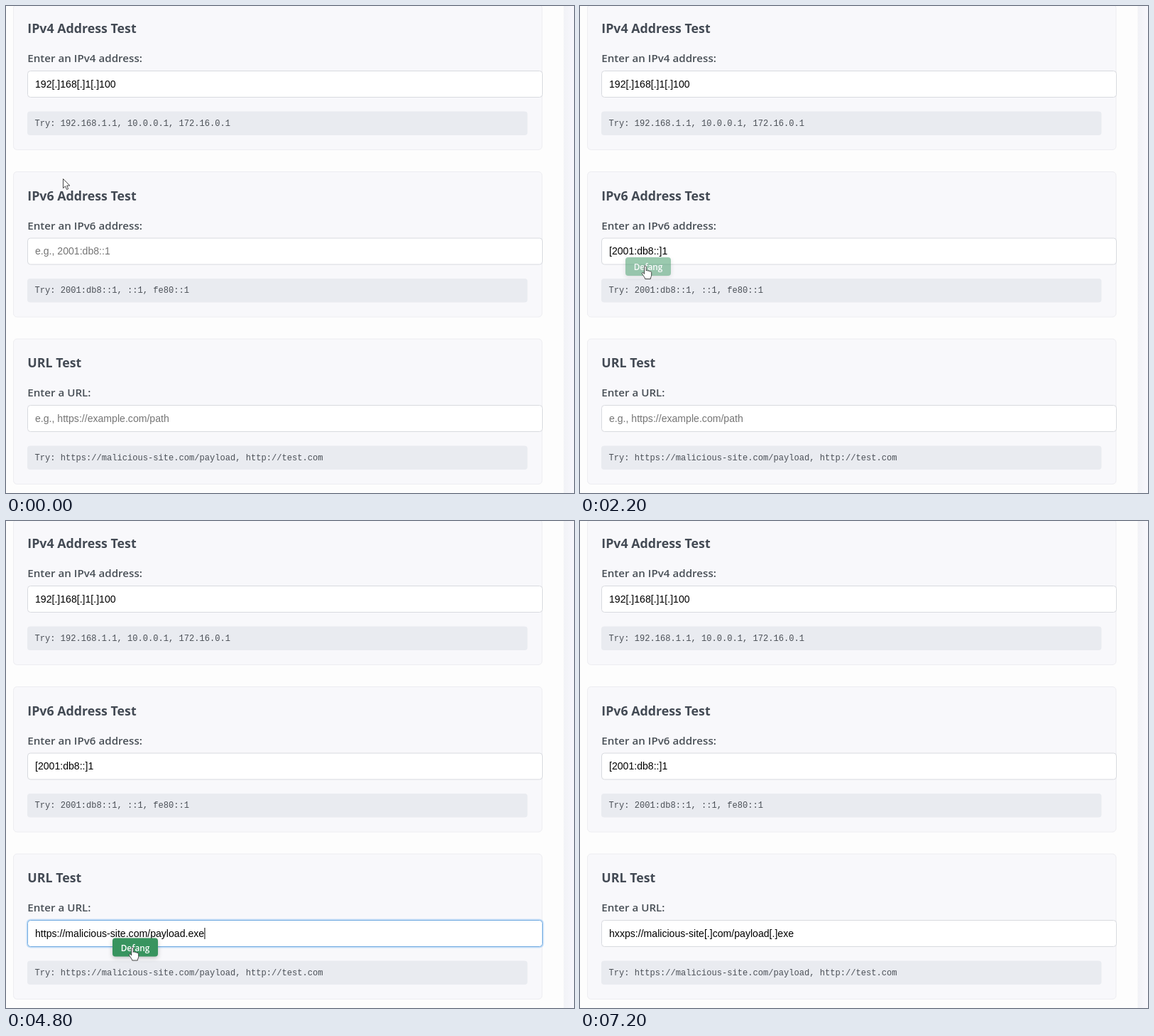
Animation of 800x686 px, one loop 7300 ms. Source, as an HTML page:

```html
<!DOCTYPE html>
<html lang="en">
<head>
<meta charset="utf-8">
<title>Defang test</title>
<style>
  html, body { margin: 0; width: 100%; height: 100%; overflow: hidden; background: #fdfdfd; }
  svg { display: block; width: 800px; height: 686px; }
  .title, .label, .btn text { font-family: "Open Sans", "Noto Sans", sans-serif; font-weight: 600; }
  .title { font-size: 17.8px; font-weight: 700; fill: #434a54; }
  .label { font-size: 15.15px; fill: #495057; }
  .value { font-family: "Liberation Sans", Arial, sans-serif; font-size: 14.1px; }
  .hint { font-family: "Liberation Mono", "Courier New", monospace; font-size: 12.08px; fill: #4b5057; white-space: pre; }
  .card { fill: #f8f8fb; stroke: #ededf1; }
  .field { fill: #fff; stroke: #d8dadf; }
  .ring { fill: none; stroke: #c9e0f8; stroke-width: 4; }
  .box { fill: #e9ebf0; }
  .btn text { font-size: 11.8px; fill: #fff; text-anchor: middle; }
  .btn rect { filter: drop-shadow(0 2px 3px rgba(0, 0, 0, .22)); }
</style>
</head>
<body>
<svg id="stage" viewBox="0 0 800 686">
  <defs>
    <linearGradient id="edge">
      <stop offset="0" stop-color="#f1f2f6"/>
      <stop offset="1" stop-color="#f8f8fd"/>
    </linearGradient>
  </defs>
  <rect width="800" height="686" fill="#fdfdfd"/>
  <rect x="785.5" width="14.5" height="686" fill="url(#edge)"/>
</svg>
<script>
const NS = "http://www.w3.org/2000/svg";
const LOOP = 7300, STEP = 100, FADE = 200;
const stage = document.getElementById("stage");

function add(parent, tag, attrs, text) {
  const el = document.createElementNS(NS, tag);
  for (const k in attrs) el.setAttribute(k, attrs[k]);
  if (text) el.textContent = text;
  parent.appendChild(el);
  return el;
}

const sections = [
  { y: 0, title: "IPv4 Address Test", label: "Enter an IPv4 address:",
    hint: "Try: 192.168.1.1, 10.0.0.1, 172.16.0.1",
    done: "192[.]168[.]1[.]100", focus: -1, paste: -1, click: -1 },
  { y: 235.5, title: "IPv6 Address Test", label: "Enter an IPv6 address:",
    hint: "Try: 2001:db8::1, ::1, fe80::1", empty: "e.g., 2001:db8::1",
    raw: "2001:db8::1", done: "[2001:db8::]1",
    focus: 900, paste: 1000, click: 2100, btn: [64, 353.5], hover: [1100, 2400] },
  { y: 471, title: "URL Test", label: "Enter a URL:",
    hint: "Try: https://malicious-site.com/payload, http://test.com",
    empty: "e.g., https://example.com/path",
    raw: "https://malicious-site.com/payload.exe",
    done: "hxxps://malicious-site[.]com/payload[.]exe",
    focus: 3600, paste: 4000, click: 5000, btn: [150, 587.5], hover: [4400, 5200] }
];

for (const s of sections) {
  const g = add(stage, "g", { transform: `translate(0 ${s.y})` });
  add(g, "rect", { class: "card", x: 10.5, y: -2, width: 744.5, height: 204.5, rx: 5 });
  add(g, "text", { class: "title", x: 30.3, y: 38 }, s.title);
  add(g, "text", { class: "label", x: 30.3, y: 79 }, s.label);
  const shape = { x: 30.5, y: 91.5, width: 725, height: 37, rx: 4 };
  s.ring = add(g, "rect", { class: "ring", ...shape });
  s.field = add(g, "rect", { class: "field", ...shape });
  s.value = add(g, "text", { class: "value", x: 41, y: 114.7 }, s.done);
  s.caret = add(g, "rect", { y: 102, width: 1, height: 16 });
  add(g, "rect", { class: "box", x: 30, y: 148.5, width: 704.5, height: 33.5, rx: 4 });
  add(g, "text", { class: "hint", x: 40.5, y: 168.7 }, s.hint);
}

for (const s of sections) {
  if (!s.btn) continue;
  s.button = add(stage, "g", { class: "btn" });
  s.face = add(s.button, "rect", { width: 64, height: 26, rx: 4 });
  add(s.button, "text", { x: 32, y: 18 }, "Defang");
}

const thin = { fill: "#fff", stroke: "#333", "stroke-width": 0.9, "stroke-linejoin": "round" };
const cursors = {
  arrow: add(stage, "path", { ...thin, d: "M.5.5V13.6L3.5 10.8 5.6 15.5 7.7 14.6 5.7 10H9.8Z" }),
  hand: add(stage, "path", { ...thin, d:
    "M-1.4 1.2C-1.4-.5 1.2-.5 1.2 1.2V7C1.6 5.8 3.6 6 3.8 7.4 4.4 6.4 6.1 6.8 6.3 8.1 " +
    "7.2 7.3 8.7 8 8.7 9.4V13C8.7 15 7.4 16 7.3 18.5H-.2C-.4 16.6-2.7 14.2-4.4 11.4" +
    "-5.3 9.8-3.6 8.9-2.6 10L-1.4 11.4Z" }),
  beam: add(stage, "path", { fill: "none", stroke: "#111", "stroke-width": 1.7,
    d: "M-4-7H-1Q0-7 0-6 0-7 1-7H4M0-6V6M-4 7H-1Q0 7 0 6 0 7 1 7H4" })
};

// time, x, y, cursor kind from that time on
const path = [
  [0, 80, 243, "arrow"], [300, 80, 246, "arrow"], [700, 86, 335, "beam"],
  [1000, 87, 346, "beam"], [1100, 88, 354, "hand"], [1200, 88, 355, "hand"],
  [1600, 92, 366, "hand"], [2300, 92, 366, "hand"], [2500, 93, 384, "arrow"],
  [3100, 90, 564, "beam"], [3300, 90.5, 577, "beam"], [3700, 92, 582, "beam"],
  [4100, 134.5, 589, "beam"], [4400, 178, 599, "hand"], [5000, 178, 601, "hand"],
  [5200, 175, 602, "arrow"], [5800, 174, 603, "arrow"], [6400, 230, 13, "arrow"],
  [6500, 230, 13, ""]
];

const clamp = v => Math.max(0, Math.min(1, v));
const ease = p => p * p * (3 - 2 * p);
const show = (el, on) => el.setAttribute("visibility", on ? "visible" : "hidden");

function drawCursor(t) {
  let i = 0;
  while (i < path.length - 1 && path[i + 1][0] <= t) i++;
  const a = path[i], b = path[i + 1] || a;
  const p = b === a ? 0 : ease((t - a[0]) / (b[0] - a[0]));
  const x = a[1] + (b[1] - a[1]) * p, y = a[2] + (b[2] - a[2]) * p;
  for (const kind in cursors) {
    show(cursors[kind], kind === a[3]);
    cursors[kind].setAttribute("transform", `translate(${x} ${y})`);
  }
}

function drawSection(s, t) {
  const focused = t >= s.focus && t < s.click;
  const pasted = t >= s.paste;
  const text = t >= s.click ? s.done : pasted ? s.raw : s.empty;
  if (s.value.textContent !== text) s.value.textContent = text;
  s.value.setAttribute("fill", pasted ? "#000" : "#757575");
  show(s.ring, focused);
  s.field.style.stroke = focused ? "#72abe0" : "";
  const caretOn = focused && (t - s.focus) % 1000 < 500;
  show(s.caret, caretOn);
  if (caretOn) s.caret.setAttribute("x", pasted ? 41.3 + s.value.getComputedTextLength() : 41);
  if (!s.button) return;
  const alpha = clamp((t - s.paste) / FADE) * (1 - clamp((t - s.click) / FADE));
  show(s.button, alpha > 0);
  s.button.setAttribute("opacity", alpha);
  s.button.setAttribute("transform", `translate(${s.btn[0]} ${s.btn[1] + (1 - alpha)})`);
  s.face.setAttribute("fill", t >= s.hover[0] && t < s.hover[1] ? "#38945f" : "#38a169");
}

function draw(t) {
  for (const s of sections) drawSection(s, t);
  drawCursor(t);
}

const start = performance.now();
function tick() {
  const t = (performance.now() - start) % LOOP;
  draw(Math.floor(t / STEP) * STEP);
  requestAnimationFrame(tick);
}
tick();
</script>
</body>
</html>
```
